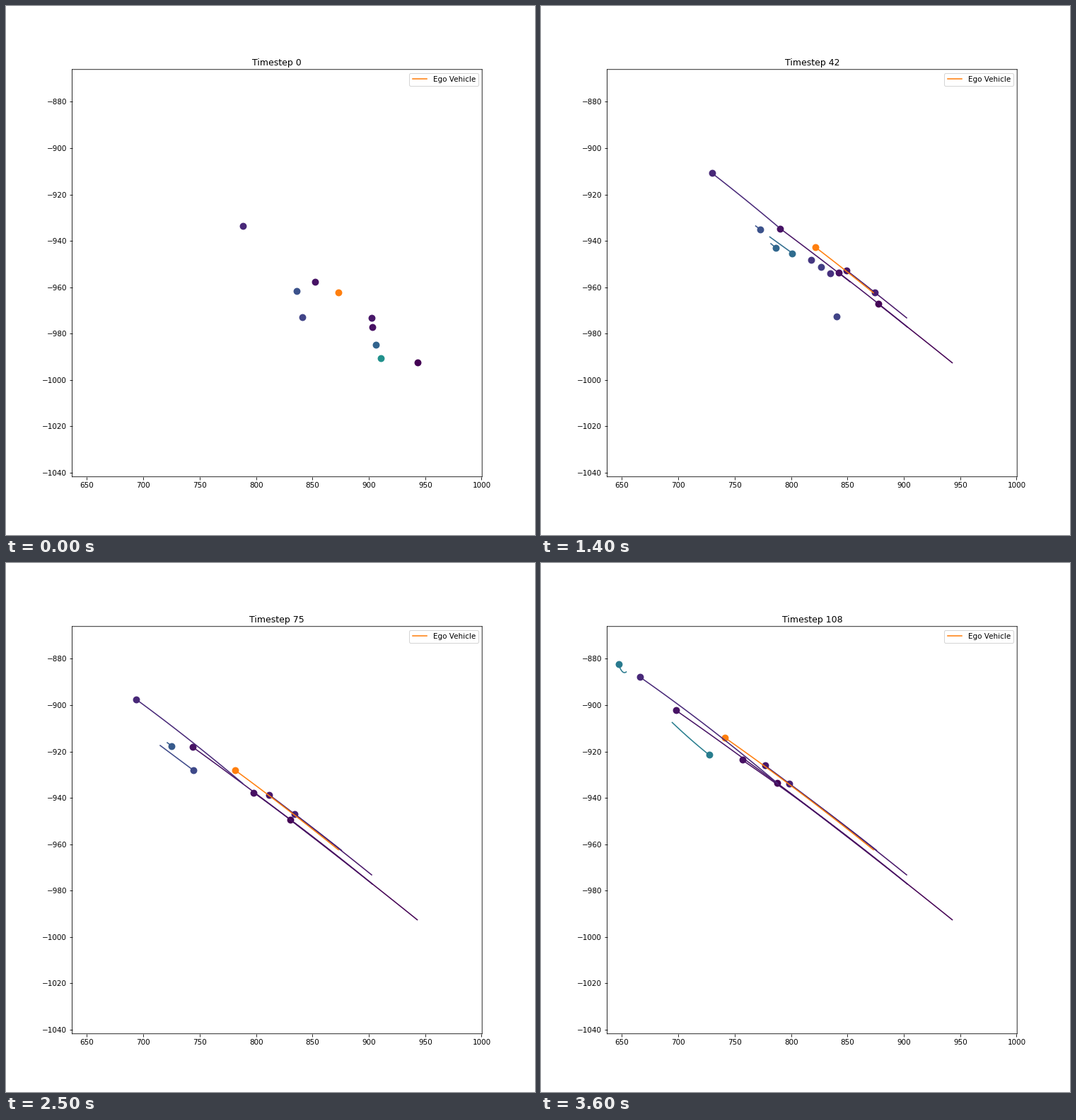
Animation of 748 by 748 pixels, one loop 3700 ms. Source, as a matplotlib script:

```python
import numpy as np
import matplotlib.pyplot as plt
from matplotlib.animation import FuncAnimation

INCHES, DPI = 10, 74.8
SIZE = INCHES * DPI
FRAMES, INTERVAL, STEP = 37, 100, 3
LAST = (FRAMES - 1) * STEP
XLIM, YLIM = (636.83, 1000.44), (-1041.75, -866.05)

plt.rcParams["font.family"] = "DejaVu Sans"
fig, ax = plt.subplots(figsize=(INCHES, INCHES), dpi=DPI)
ax.set(xlim=XLIM, ylim=YLIM)
ax.spines[:].set_snap(False)
title = ax.set_title("Timestep 0")
cars = []


def to_data(x, y):
    """Stage pixels (y down) to axes data."""
    u = (x / SIZE - 0.125) / 0.775
    v = (0.89 - y / SIZE) / 0.77
    return XLIM[0] + u * (XLIM[1] - XLIM[0]), YLIM[0] + v * (YLIM[1] - YLIM[0])


def car(color, life, start, end=None, brake=0, bow=0, label=None):
    """Drive from start to end; brake > 0 slows down, bow lifts the middle."""
    if not isinstance(color, str):
        color = plt.cm.viridis(color)
    t = np.arange(life[0], life[1] + 1)
    u = np.linspace(0, 1, len(t))
    p = u + brake * u * (1 - u)
    (x0, y0), (x1, y1) = start, end or start
    path = to_data(x0 + (x1 - x0) * p, y0 + (y1 - y0) * p - bow * 4 * p * (1 - p))
    line, = ax.plot([], [], color=color, lw=1.5, label=label)
    dot, = ax.plot([], [], "o", color=color, ms=8, mew=1.5, zorder=1, snap=False)
    cars.append((t, path, line, dot))


# Convoy followed through the whole scene
ALL = (0, LAST)
car(0.00, ALL, (581.5, 504.5), (334, 311.5), brake=0.14, bow=1.6)
car(0.04, ALL, (518, 454), (284.5, 278.5), brake=0.11, bow=4)
car(0.05, ALL, (437, 390), (191, 208.5), brake=0.05, bow=2.5)
car(0.06, ALL, (517, 441), (317, 286.5), brake=0.145, bow=1.7)
car(0.11, ALL, (334.5, 311.5), (139.5, 161), brake=0.37, bow=3.6)
car(0.09, (41, LAST), (474.5, 406.3), (350.5, 312), brake=0.1, bow=1)

# Parked, with a little drift
car(0.20, (0, 54), (419, 440), (417.5, 438.5), brake=0.5)
car(0.16, (6, 72), (384, 359.5), (382, 358.5), brake=1)
car(0.18, (6, 54), (395.5, 369), (395.5, 368.5))
car(0.14, (9, 54), (412, 381), (408.5, 378), brake=1)

# Oncoming, early
car(0.25, (0, 36), (411, 403), (487.5, 462.5))
car(0.32, (0, 36), (523, 479), (630.5, 563))
car(0.50, (0, 24), (530, 498.5), (573, 531.5), bow=1)
car(0.51, (2, 24), (461, 431.5), (519, 476))
car(0.42, (5, 24), (465, 446), (513, 483))

# Same direction, early
car(0.55, (3, 24), (562.5, 477.5), (514, 439))
car(0.63, (4, 24), (602, 515), (561, 470), bow=-1)
car(0.39, (6, 36), (657.5, 563), (582, 502), brake=-0.15, bow=1)

# Brief detections
car(0.66, (18, 24), (477, 467))
car(0.54, (18, 24), (536, 533))
car(0.46, (18, 24), (432, 298))
car(0.76, (18, 24), (459.5, 123))
car(0.69, (27, 33), (416, 349), (422, 337))
car(0.59, (87, 93), (253, 233.5))

# Oncoming, later
car(0.45, (20, 36), (370, 360), (409, 391), bow=-1.5)
car(0.35, (27, 54), (323.5, 326.5), (381, 368))
car(0.25, (39, 72), (303.5, 311), (372, 363))
car(0.33, (39, 72), (325, 336), (399.5, 394.5), bow=-1)
car(0.22, (60, 102), (218, 258), (350, 356.5))
car(0.28, (73, 96), (228, 254), (297, 306))
car(0.42, (85, LAST), (185.5, 225.5), (238, 271.5), bow=-1)
car(0.41, (84, LAST), (120.5, 154), (109.5, 143), brake=1, bow=-5)

car("tab:orange", ALL, (470, 405.5), (260, 247), bow=2.7, label="Ego Vehicle")
ax.legend(loc="upper right")


def update(i):
    now = i * STEP
    title.set_text(f"Timestep {now}")
    for t, (x, y), line, dot in cars:
        n = now - t[0] + 1 if t[0] <= now <= t[-1] else 0
        line.set_data(x[:n], y[:n])
        dot.set_data(x[max(n - 1, 0):n], y[max(n - 1, 0):n])
    return []


anim = FuncAnimation(fig, update, frames=FRAMES, init_func=lambda: update(0),
                     interval=INTERVAL, repeat=True, repeat_delay=0)
plt.show()
```
